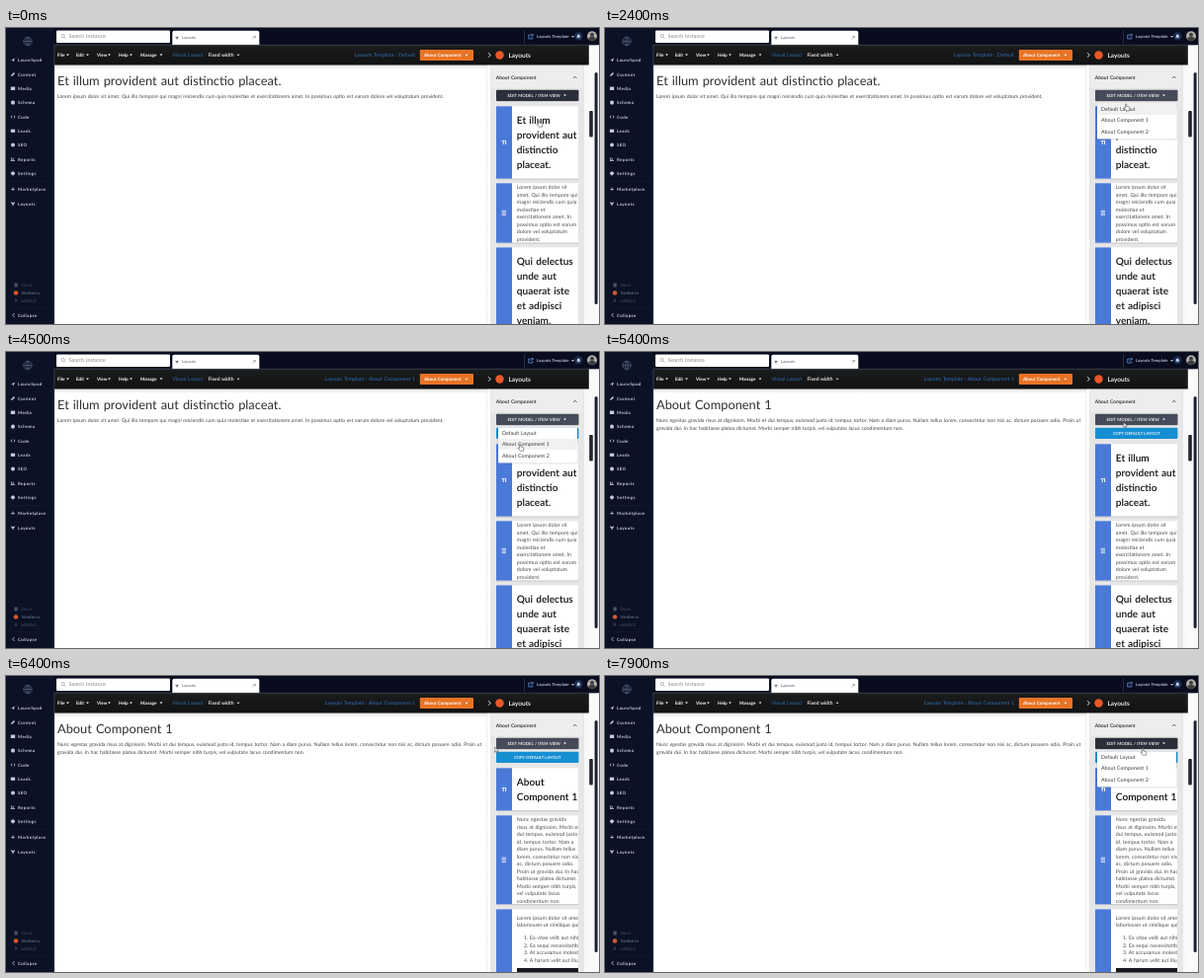
Write an HTML page that moves like this. It is 600 px wide and 300 px high and loops after 8 s.

```html
<!DOCTYPE html>
<html lang="en">
<head>
<meta charset="utf-8">
<title>Layout editor</title>
<style>
html, body { margin: 0; width: 100%; height: 100%; overflow: hidden; background: #080c1e; }
svg { display: block; width: 600px; height: 300px; }
text { font-family: Lato, "Open Sans", sans-serif; word-spacing: .06em; text-rendering: geometricPrecision; white-space: pre; }
</style>
</head>
<body>
<svg id="stage" viewBox="0 0 600 300" xmlns="http://www.w3.org/2000/svg"></svg>
<script>
const LOOP = 8000;
const BLUE = '#4a79d8';
const stage = document.getElementById('stage');

// Markup helpers
const rect = (x, y, w, h, fill, more = '') =>
  `<rect x="${x}" y="${y}" width="${w}" height="${h}" fill="${fill}" ${more}/>`;
const text = (x, y, size, fill, str, more = '') =>
  `<text x="${x}" y="${y}" font-size="${size}" fill="${fill}" ${more}>${str}</text>`;
const lines = (x, y, step, size, fill, rows, more) =>
  rows.map((row, i) => text(x, y + i * step, size, fill, row, more)).join('');
const path = (d, more) => `<path d="${d}" ${more}/>`;
const circle = (x, y, r, fill, more = '') =>
  `<circle cx="${x}" cy="${y}" r="${r}" fill="${fill}" ${more}/>`;
const caret = (x, y, fill = '#fff') => path(`M${x - 1.4} ${y - .7}h2.8l-1.4 1.6z`, `fill="${fill}"`);
const group = (id, body) => `<g id="${id}">${body}</g>`;
const stroke = (color, w) => `fill="none" stroke="${color}" stroke-width="${w}"`;
const bold = 'font-weight="700"';
const semi = 'font-weight="600"';

// Left navigation: label, centre y, icon drawn around 0,0
const NAV = [
  ['Launchpad', 32.5, 'M-2.2 .3L2.3-2.2L.4 2.3L-.3 .3z'],
  ['Content', 47, 'M-2.2 2.2l.4-1.7L1-2.3L2.3-1L-.5 1.8z'],
  ['Media', 61.3, 'M-2.4-1.9h4.8v3.8h-4.8z'],
  ['Schema', 75.6, 'M-2-1.6q2-1.2 4 0v3.2q-2 1.2-4 0z'],
  ['Code', 90, 'M-1.2-1.8L-2.7 0L-1.2 1.8L-.7 1.3L-1.7 0L-.7-1.3zM1.2-1.8L2.7 0L1.2 1.8L.7 1.3L1.7 0L.7-1.3z'],
  ['Leads', 104.3, 'M-2.4-1.8h4.8v3.6h-4.8z'],
  ['SEO', 118.6, 'M-2.2 0a2.2 2.2 0 1 0 4.4 0a2.2 2.2 0 1 0-4.4 0z'],
  ['Reports', 133, 'M-2.3-2h.8v3.3h3.8v.8h-4.6zM-.9-.3h.8v1.2h-.8zM.4-1.5h.8v2.4h-.8z'],
  ['Settings', 147.3, 'M-.6-2.4h1.2l.3.9l1 .4l.6 1.1l-.6 1.1l-1 .4l-.3.9h-1.2l-.3-.9l-1-.4l-.6-1.1l.6-1.1l1-.4z'],
  ['Marketplace', 163.3, 'M-.4-2h.8v1.6h1.6v.8h-1.6v1.6h-.8v-1.6h-1.6v-.8h1.6z'],
  ['Layouts', 178, 'M-2.1-1.9l2.1 1l2.1-1q.2 2-1.5 2.7v1.5h-1.2v-1.5q-1.7-.7-1.5-2.7z']
];

function sidebar() {
  const spaced = `${bold} letter-spacing=".38"`;
  const ink = '#c6cbd8', dim = '#4b546b';
  const items = NAV.map(([label, y, d]) =>
    `<g transform="translate(7 ${y}) scale(.9)">${path(d, `fill="${ink}"`)}</g>` +
    text(12, y + 1.6, 4.4, ink, label, spaced)).join('');
  return rect(0, 0, 49, 300, '#0b1226') +
    circle(22, 13.5, 4.2, 'none', 'stroke="#5e6b86" stroke-width=".7"') +
    path('M17.8 13.5h8.4M22 9.3v8.4M22 9.3q-4 4.2 0 8.4q4-4.2 0-8.4', stroke('#5e6b86', .6)) +
    items +
    rect(3, 155, 42, .4, '#1a2238') + rect(3, 283, 42, .4, '#1a2238') +
    rect(8.5, 258.5, 3.2, 4, dim) + text(15.5, 262.2, 4.4, dim, 'Docs', 'letter-spacing=".3"') +
    circle(10, 268.5, 2.3, '#d9562c') + text(15.5, 270.2, 4.4, '#7b849b', 'Vambe.io', 'letter-spacing=".1"') +
    text(8.4, 278.4, 5, dim, '#') + text(15.5, 278.2, 4.2, dim, 'a4f81c2') +
    path('M8.6 289l-2 2l2 2', stroke(ink, .8)) +
    text(12, 292.7, 4.4, ink, 'Collapse', spaced);
}

function topBar() {
  return rect(49, 0, 551, 17.5, '#080c1e') +
    rect(51, 2.4, 115, 12.6, '#fff', 'rx="1.2"') +
    circle(57.7, 8, 1.6, 'none', 'stroke="#888" stroke-width=".6"') +
    path('M58.9 9.2l1.5 1.6', stroke('#888', .6)) +
    text(63.5, 10.4, 5.4, '#858585', 'Search Instance') +
    path('M168.3 17.2V4.6q0-1.8 1.8-1.8h84.4q1.8 0 1.8 1.8v12.6z', 'fill="#fff"') +
    `<g transform="translate(173 9.8) scale(.75)">${path(NAV[10][2], 'fill="#5b6478"')}</g>` +
    text(178, 11.2, 4.1, '#555e70', 'Layouts') +
    path('M249.4 11.2l1.6-1.6M250.4 8.4l1.9 1.9M250.9 8.8l1.2-.8l.8.8l-.8 1.2', stroke('#777f90', .6)) +
    rect(524.2, 2, .6, 14, '#3a4359') +
    path('M531.5 7h-2.8v4h4v-2M530.5 9.2l2.6-2.6M531.7 6.4h1.6v1.6', stroke('#6d9fe8', .7)) +
    text(537, 10.3, 4.2, '#c8d2ea', 'Layouts Template', semi) + caret(573.5, 8.8, '#c8d2ea') +
    circle(579.3, 8.3, 4.2, '#1b2b50') +
    path('M577.3 9.8q.6-.6.6-1.8q0-1.4 1.4-1.4t1.4 1.4q0 1.2.6 1.8zM578.7 10.2h1.2l-.6.6z', 'fill="#c8d2ea"') +
    circle(593, 8.2, 5, '#b3aea7') +
    path('M589 11.2q1-2.8 4-2.8t4 2.8q-1.6 2-4 2t-4-2z', 'fill="#3b3d42"') +
    circle(593, 6.7, 2, '#3b3d42');
}

function header() {
  const menu = [['File', 52, 62.5], ['Edit', 71, 82.5], ['View', 92, 104.5], ['Help', 114, 126.5], ['Manage', 136, 157]];
  return rect(49, 17.2, 541, 20.3, 'url(#bar)') +
    menu.map(([s, x, c]) => text(x, 29, 4.6, '#fff', s, bold) + caret(c, 27.3)).join('') +
    text(168.5, 29.2, 5.2, '#2f6fb8', 'Visual Layout') +
    text(204.5, 29.2, 5, '#fff', 'Fixed width', semi) + caret(235, 27.4) +
    `<text id="crumb" x="414" y="29.2" font-size="5.2" fill="#2f6fb8" text-anchor="end"></text>` +
    rect(418.8, 22, 54.2, 11, '#e87426', 'rx="1"') +
    text(423, 29.2, 4.5, '#fff', 'About Component', bold) + caret(466, 27.5) +
    path('M488.2 25.2l2 2.2l-2 2.2', stroke('#fff', .9)) +
    circle(499.5, 27.5, 4.2, '#e9592b') +
    text(508.5, 29.8, 6.5, '#fff', 'Layouts', semi);
}

function card(y, h, icon, body) {
  const cy = y + h / 2;
  const mark = icon === 'title'
    ? text(504, cy + 2, 5.6, '#fff', 'TI', 'font-weight="900" text-anchor="middle"')
    : path(`M501.6 ${cy - 2.2}h4.4m-4.4 1.5h4.4m-4.4 1.5h4.4m-4.4 1.5h4.4`, stroke('#fff', .7));
  return rect(496, y + .8, 83.4, h, '#000', 'opacity=".2"') +
    rect(496, y, 83.4, h, '#fff') + rect(496, y, 16, h, BLUE) + mark +
    `<g clip-path="url(#cardClip)">${body}</g>`;
}
const title = (y, rows) => lines(516.8, y + 17.5, 15, 10.15, '#111', rows, semi);
const para = (y, rows) => lines(516.8, y + 6, 7.5, 5.3, '#4c4c4c', rows);

function defaultCards() {
  return card(79.3, 73.3, 'title', title(79.3, ['Et illum', 'provident aut', 'distinctio', 'placeat.'])) +
    card(157.3, 60.3, 'body', para(157.3, ['Lorem ipsum dolor sit', 'amet. Qui illo tempore qui',
      'magni reiciendis cum quia', 'molestiae et', 'exercitationem amet. In', 'possimus optio est earum',
      'dolore vel voluptatum', 'provident.'])) +
    card(222.4, 200, 'title', title(222.4, ['Qui delectus', 'unde aut', 'quaerat iste', 'et adipisci', 'veniam.']));
}

function componentCards() {
  const list = ['Ea vitae velit aut nihil', 'Ea sequi necessitatibus', 'At accusamus molestias', 'A harum velit aut illum'];
  return card(93.3, 43, 'title', title(93.3, ['About', 'Component 1'])) +
    card(141.3, 90, 'body', para(141.3, ['Nunc egestas gravida', 'risus at dignissim. Morbi et',
      'dui tempus, euismod justo', 'id, tempus tortor. Nam a', 'diam purus. Nullam tellus',
      'lorem, consectetur non nisi', 'ac, dictum posuere odio.', 'Proin ut gravida dui. In hac',
      'habitasse platea dictumst.', 'Morbi semper nibh turpis,', 'vel vulputate lacus', 'condimentum non.'])) +
    card(236.4, 200, 'body',
      para(240.8, ['Lorem ipsum dolor sit amet', 'laboriosam ut similique quis']) +
      lines(524, 267, 7.6, 5.3, '#4c4c4c', list.map((s, i) => `${i + 1}. ${s}`)) +
      rect(517, 296, 70, 10, '#16181d'));
}

function panel() {
  return rect(490, 37.5, 95, 263, '#e6e6e6') +
    rect(491, 38.5, 92.5, 22.5, '#ededed') +
    text(495.8, 51.8, 4.95, '#222', 'About Component', semi) +
    path('M574 51l1.8-1.9l1.8 1.9', stroke('#333', .7)) +
    group('oldCards', defaultCards()) + group('newCards', componentCards()) +
    group('copy', rect(496, 76.7, 83.4, 11.3, '#168fd2', 'rx="1"') +
      text(537.7, 83.9, 4.2, '#fff', 'COPY DEFAULT LAYOUT', `${semi} text-anchor="middle"`)) +
    rect(496, 63.2, 83.4, 11.4, '#000', 'rx="1" opacity=".2"') +
    rect(496, 62.7, 83.4, 11.3, '#2b2f39', 'id="edit" rx="1"') +
    text(507.5, 69.9, 4.3, '#fff', 'EDIT MODEL / ITEM VIEW', semi) + caret(565.5, 68.3) +
    rect(585, 37.5, 5, 263, '#f8f8f8');
}

// Scroll tracks at the right edge
function scrollbars() {
  return rect(589.8, 17.2, 10.2, 283, '#fafafa') +
    rect(590.2, 84, 3.6, 26.5, '#23262d', 'rx="1"') +
    rect(595.6, 45, 3, 235, '#1b2030', 'rx="1.5"');
}

function menuBox() {
  return rect(497.6, 77, 80.8, 36.2, '#000', 'opacity=".16" rx="1"') +
    rect(498, 76.5, 80, 36, '#fff', 'rx="1"') +
    rect(498, 77, 80, 11, '#f1f1f1', 'id="hover"') +
    lines(502, 84.2, 11.2, 5.27, '#3a3a3a', ['Default Layout', 'About Component 1', 'About Component 2']);
}

function pageContent() {
  const lead = ['Lorem ipsum dolor sit amet. Qui illo tempore qui magni reiciendis cum quia molestiae et exercitationem amet. In possimus optio est earum dolore vel voluptatum provident.'];
  const about = ['Nunc egestas gravida risus at dignissim. Morbi et dui tempus, euismod justo id, tempus tortor. Nam a diam purus. Nullam tellus lorem, consectetur non nisi ac, dictum posuere odio. Proin ut',
    'gravida dui. In hac habitasse platea dictumst. Morbi semper nibh turpis, vel vulputate lacus condimentum non.'];
  const block = (head, rows) => text(52, 57.8, 12.83, '#2f2f2f', head) + lines(52, 71.2, 7.6, 5.13, '#444', rows);
  return rect(49, 37, 541, 263, '#fff') +
    rect(49, 37, 438, 5, 'url(#shade)') +
    path('M486.7 38V300', `${stroke('#d2d2d2', .6)} stroke-dasharray="1.5 1"`) +
    group('oldPage', block('Et illum provident aut distinctio placeat.', lead)) +
    group('newPage', block('About Component 1', about));
}

const outline = 'transform="scale(.82)" fill="#fff" stroke="#333" stroke-width=".6" stroke-linejoin="round"';
const hand = path('M-1.8-4.2q.8-.8 1.4 0v3l3 .5q1 .3.8 1.5l-.6 3.2h-3.8l-2.4-3q-.3-1 .6-1l1 .7z', outline);
const arrow = path('M-1.5-3.5v6.3l1.5-1.3l1 2.2l.9-.4l-1-2.1h2z', outline);

const gradient = (id, from, to) =>
  `<linearGradient id="${id}" x2="0" y2="1">${from}${to}</linearGradient>`;

stage.innerHTML = '<defs>' +
  gradient('bar', '<stop stop-color="#1b1c1d"/>', '<stop offset="1" stop-color="#111213"/>') +
  gradient('shade', '<stop stop-color="#000" stop-opacity=".14"/>', '<stop offset="1" stop-color="#000" stop-opacity="0"/>') +
  '<clipPath id="cardClip"><rect x="512" y="60" width="67" height="240"/></clipPath></defs>' +
  rect(0, 0, 600, 300, '#080c1e') + sidebar() + topBar() + pageContent() + panel() + header() + scrollbars() +
  path('M48.8 300V17.2H597', stroke('#5c6475', .5)) +
  group('menu', menuBox()) + group('cursor', group('hand', hand) + group('arrow', arrow));

const el = {};
stage.querySelectorAll('g[id], #crumb, #edit, #hover').forEach(n => el[n.id] = n);

// Pointer stops: time, x, y
const TRAIL = [
  [0, 540, 97], [200, 540, 97], [1000, 549, 70], [1600, 550, 69], [2000, 550, 69], [2700, 514, 88],
  [3200, 514, 94], [3700, 516, 94], [4500, 521, 97], [4900, 522, 94], [5400, 526, 74],
  [5900, 512, 75], [6400, 496, 75], [7200, 496, 75], [7550, 545, 70], [7900, 545, 77], [8000, 545, 77]
];

const clamp = v => Math.max(0, Math.min(1, v));
const ramp = (t, from, span) => clamp((t - from) / span);

function pointer(t) {
  const i = Math.max(1, TRAIL.findIndex(p => p[0] > t));
  const [t0, x0, y0] = TRAIL[i - 1], [t1, x1, y1] = TRAIL[i];
  const k = ramp(t, t0, t1 - t0), e = k * k * (3 - 2 * k);
  return [x0 + (x1 - x0) * e, y0 + (y1 - y0) * e];
}

const show = (node, on) => node.setAttribute('display', on ? 'inline' : 'none');

function render(t) {
  const chosen = t >= 4200, pageReady = t >= 5100, cardsReady = t >= 5700;
  const opened = t < 5000 ? ramp(t, 2000, 150) - ramp(t, 4600, 250) : ramp(t, 7500, 150);

  el.crumb.textContent = 'Layouts Template : ' + (chosen ? 'About Component 1' : 'Default');
  show(el.oldPage, !pageReady);
  show(el.newPage, pageReady);
  show(el.oldCards, !cardsReady);
  show(el.newCards, cardsReady);
  show(el.copy, chosen);
  el.oldCards.setAttribute('transform', `translate(0 ${chosen ? 14 : 0})`);

  show(el.menu, opened > 0);
  el.menu.setAttribute('opacity', opened);
  show(el.hover, t < 7000);
  el.hover.setAttribute('y', t < 3400 ? 77 : 88);
  el.edit.setAttribute('fill', t >= 2200 && t < 7400 ? '#464b59' : '#2b2f39');

  const [x, y] = pointer(t);
  const overLink = t < 5100 || t >= 7350;
  el.cursor.setAttribute('transform', `translate(${x.toFixed(2)} ${y.toFixed(2)})`);
  show(el.hand, overLink);
  show(el.arrow, !overLink);
}

function tick() {
  render(performance.now() % LOOP);
  requestAnimationFrame(tick);
}
tick();
</script>
</body>
</html>
```
